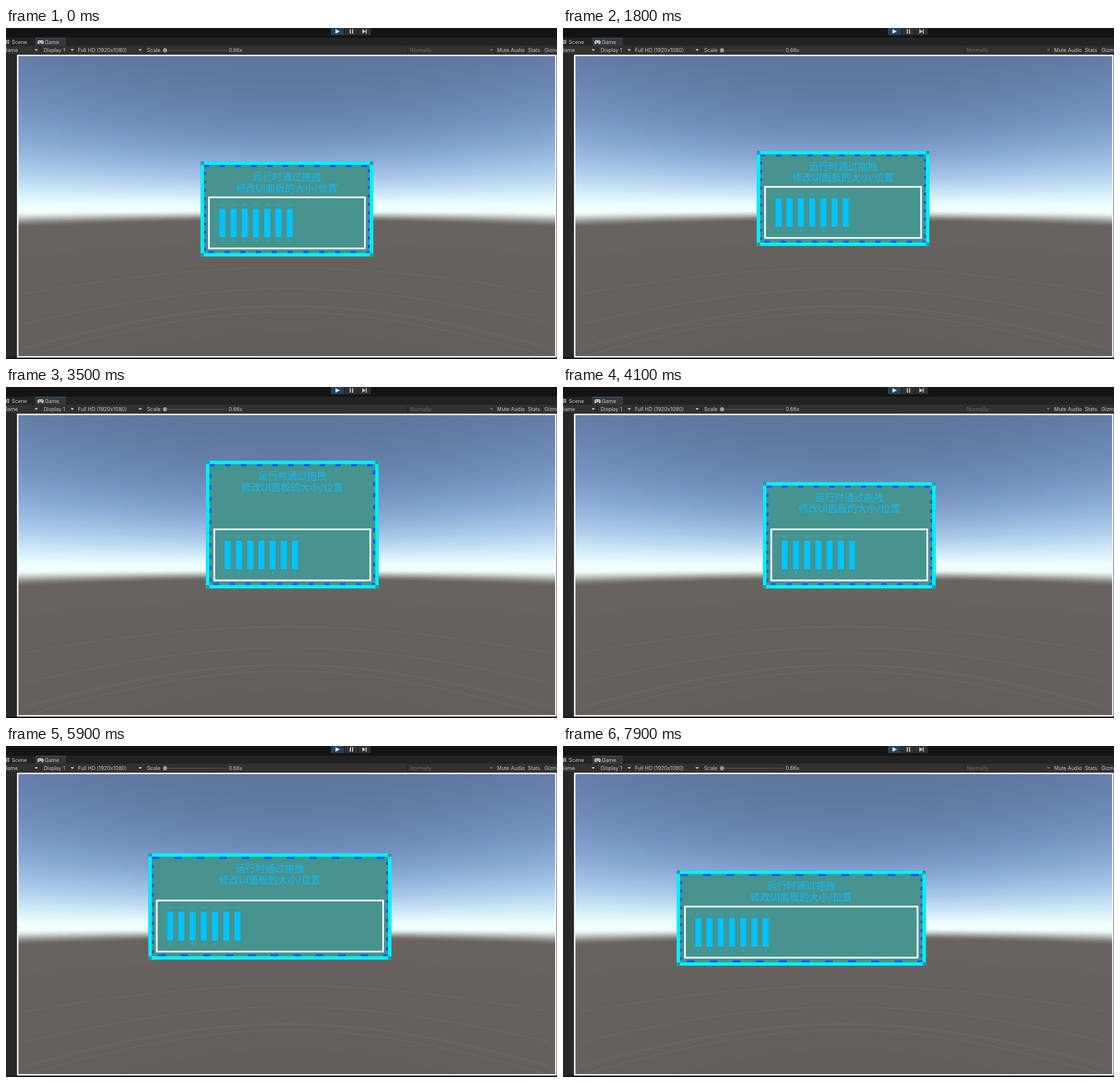
Write an HTML page with a canvas that moves like this. It is 965 by 580 pixels and loops after 8 s.

```html
<!DOCTYPE html>
<html lang="zh">
<head>
<meta charset="utf-8">
<style>
html, body { margin: 0; width: 100%; height: 100%; overflow: hidden; background: #282828; }
canvas, svg { position: absolute; left: 0; top: 0; display: block; }
.ui { font: 9px Inter, "Liberation Sans", sans-serif; fill: #c8c8c8; }
.title { font: 500 17.1px "Noto Sans CJK SC", "Noto Sans CJK", sans-serif; fill: #12baf4; text-anchor: middle; }
.small { font-family: "Liberation Sans", Arial, sans-serif; fill: #12baf4; text-anchor: middle; }
</style>
</head>
<body>
<canvas id="sky" width="965" height="580"></canvas>
<svg id="stage" width="965" height="580" viewBox="0 0 965 580"></svg>
<script>
const NS = "http://www.w3.org/2000/svg";
const stage = document.getElementById("stage");

function set(el, attrs) {
  for (const k in attrs) el.setAttribute(k, attrs[k]);
}
function add(parent, tag, attrs, text) {
  const el = document.createElementNS(NS, tag);
  set(el, attrs);
  if (text) el.textContent = text;
  parent.appendChild(el);
  return el;
}
const box = (x, y, width, height, fill, parent = stage) =>
  add(parent, "rect", { x, y, width, height, fill });
const label = (x, y, text, fill = "#c8c8c8") =>
  add(stage, "text", { x, y, class: "ui", style: "fill:" + fill }, text);
const shape = (d, fill = "#c4c4c4") => add(stage, "path", { d, fill });
const clamp = k => Math.min(1, Math.max(0, k));

// Skybox through a 60 degree camera: colour depends on elevation only
const CX = 492, CY = 312, FOCAL = 455;
const stretch = x => Math.hypot(FOCAL, x - CX) / FOCAL;

// Red fades fastest with height, blue slowest
const CHANNELS = [
  { zenith: 92, horizon: 240, reach: 70, power: 1.1, ground: 106 },
  { zenith: 114, horizon: 255, reach: 86, power: 1.2, ground: 100 },
  { zenith: 150, horizon: 254, reach: 128, power: 1.5, ground: 97 }
];
function skyColour(v) {
  const up = Math.max(0, -v), down = Math.max(0, v);
  const k = clamp((v - 6) / 20), haze = 1 - k * k * (3 - 2 * k);
  return CHANNELS.map(c => {
    const sky = c.zenith + (c.horizon - c.zenith) * Math.exp(-((up / c.reach) ** c.power));
    const ground = c.ground - down * .025;
    return ground + (sky - ground) * haze;
  });
}

function drawSky() {
  const ctx = document.getElementById("sky").getContext("2d");
  const ramp = [];
  for (let i = 0; i <= 1080; i++) ramp.push(skyColour(i / 2 - 270));
  const x0 = 21, y0 = 48, w = 942, h = 529;
  const img = ctx.createImageData(w, h);
  for (let x = 0; x < w; x++) {
    const s = stretch(x + x0);
    for (let y = 0; y < h; y++) {
      const v = (y + y0 - CY) / s;
      img.data.set([...ramp[Math.round((v + 270) * 2)], 255], (y * w + x) * 4);
    }
  }
  ctx.putImageData(img, x0, y0);
  ctx.strokeStyle = "rgba(150,146,140,.2)";
  for (const v of [108, 145, 175, 186]) {
    ctx.beginPath();
    for (let x = 30; x < 955; x += 5) ctx.lineTo(x, CY + v * stretch(x));
    ctx.stroke();
  }
}

function drawEditor() {
  box(0, 0, 965, 17, "#141414");
  box(0, 17, 965, 15, "#232323");
  box(51, 17, 54, 15, "#383838");
  box(51, 17, 54, 1, "#2f5f8f");
  box(0, 31, 965, 15, "#313131");
  box(0, 46, 965, 1, "#181818");
  box(0, 577, 965, 3, "#161616");
  add(stage, "rect", { x: 20.5, y: 48, width: 942.5, height: 528.2, fill: "none", stroke: "#fcfcfc", "stroke-width": 2.5 });

  box(569, 0, 23, 12.5, "#21435f");
  box(593, 0, 23, 12.5, "#303030");
  box(617, 0, 22, 12.5, "#303030");
  shape("M577 2L585 6L577 10Z", "#d8e4ee");
  shape("M602 2h2v8h-2zM606 2h2v8h-2z");
  shape("M624 2L630 6L624 10ZM630 2h1.7v8h-1.7z");

  shape("M0 22h6v1h-6zM0 25.5h6v1h-6zM1 20.5h1v8h-1zM4 20.5h1v8h-1z");
  shape("M58 21.5h5q3 0 3 3.5t-2 3.5l-2-2h-3l-2 2q-2 0-2-3.5t3-3.5z");
  box(57.5, 24, 2, 1, "#383838");
  box(62, 24, 1.5, 1, "#383838");
  label(10, 28, "Scene");
  label(68, 28, "Game");

  for (const x of [60, 122, 242, 703, 856, 910, 939]) box(x, 32, 1, 14, "#242424");
  label(-4, 42, "Game");
  label(66, 42, "Display 1");
  label(126, 42, "Full HD (1920x1080)");
  label(247, 42, "Scale");
  label(390, 42, "0.66x");
  label(707, 42, "Normally", "#6c6c6c");
  label(860, 42, "Mute Audio");
  label(914, 42, "Stats");
  label(943, 42, "Gizmos");
  for (const x of [53, 116, 235]) shape(`M${x - 3} 37h6l-3 3.5z`);
  shape("M847 37h6l-3 3.5z", "#6c6c6c");
  box(278, 38.5, 108, 1, "#5c5c5c");
  add(stage, "circle", { cx: 278.5, cy: 39, r: 3.7, fill: "#999" });
}

drawSky();
drawEditor();

// Panel parts
const panel = add(stage, "g", {});
const fill = box(0, 0, 1, 1, "#46938f", panel);
const dashes = [0, .285, .87, .55].map(start => ({
  start, el: add(panel, "line", { stroke: "#0050ff", "stroke-width": 3.6 })
}));
const rim = add(panel, "rect", { fill: "none", stroke: "#00f0fc", "stroke-width": 6 });
const knobs = [0, 1, 2, 3].map(() =>
  add(panel, "circle", { r: 2.6, fill: "#2fa8a8", stroke: "#22787e", "stroke-width": 1 }));
const titles = add(panel, "g", { class: "title" });
add(titles, "text", { y: 33.3 }, "运行时通过拖拽");
add(titles, "text", { y: 52.8 }, "修改UI面板的大小/位置");
const inner = add(panel, "rect", { fill: "none", stroke: "#fff", "stroke-width": 2.9 });
const chart = add(panel, "g", {});
for (let i = 0; i < 7; i++) {
  const x = 32.9 + i * 19.65;
  box(x, -83.6, 10.4, 50, "#00c3ff", chart);
  add(chart, "text", { x: x + 5.2, y: -89.3, class: "small", "font-size": 5 }, "100");
  add(chart, "text", { x: x + 5.2, y: -24, class: "small", "font-size": 7 }, "A");
}

// Each drag shifts the named edges by dx, dy; bx, by bow the path on the way
const drag = (start, end, edges, dx, dy, bx = 0, by = 0) =>
  ({ start, end, edges, dx, dy, bx, by });
const DRAGS = [
  drag(900, 1400, "ltrb", 102.2, -49.6, 0, -38),
  drag(1400, 1800, "ltrb", -103.7, 31.2),
  drag(1800, 2200, "ltrb", 10.9, -28.9, 30.5, -23.5),
  drag(3400, 3700, "t", 0, -94.2, 0, -30),
  drag(3800, 4100, "t", 0, 74.4),
  drag(4900, 5200, "r", 241.3, 0),
  drag(5300, 5500, "r", -118, 0),
  drag(5700, 6000, "ltrb", -151.2, 32),
  drag(7100, 7400, "tr", 157.2, -104.4, 17, 1.4),
  drag(7400, 7900, "tr", -146.4, 123.9)
];

function panelAt(t) {
  const p = { l: 340.8, t: 233.8, r: 643.2, b: 400.3 };
  for (const d of DRAGS) {
    const k = clamp((t - d.start) / (d.end - d.start));
    const bow = Math.sin(Math.PI * k);
    for (const e of d.edges)
      p[e] += e === "l" || e === "r" ? d.dx * k + d.bx * bow : d.dy * k + d.by * bow;
  }
  return p;
}

function draw(ms) {
  // The screen refreshes ten times a second
  const { l, t, r, b } = panelAt(Math.floor(ms % 8000 / 100) * 100);
  const w = r - l, h = b - t;
  set(fill, { x: l, y: t, width: w, height: h });
  set(rim, { x: l + 3, y: t + 3, width: w - 6, height: h - 6 });
  const L = l + 6, T = t + 6, R = r - 6, B = b - 6;
  const lines = [
    [L, T + 1.8, R, T + 1.8], [L, B - 1.4, R, B - 1.4],
    [L + 1.6, T, L + 1.6, B], [R - 1.6, T, R - 1.6, B]
  ];
  dashes.forEach(({ el, start }, i) => {
    const [x1, y1, x2, y2] = lines[i];
    const step = (i < 2 ? R - L : B - T) / 10.5;
    set(el, {
      x1, y1, x2, y2,
      "stroke-dasharray": `${step * .33} ${step * .67}`,
      "stroke-dashoffset": -start * step
    });
  });
  knobs.forEach((k, i) => set(k, { cx: i % 2 ? r - 3 : l + 3, cy: i < 2 ? t + 3 : b - 3 }));
  titles.setAttribute("transform", `translate(${(l + r) / 2} ${t})`);
  set(inner, { x: l + 14.6, y: b - 103.6, width: w - 29.2, height: 89.5 });
  chart.setAttribute("transform", `translate(${l} ${b})`);
}

const begin = performance.now();
function tick() {
  draw(performance.now() - begin);
  requestAnimationFrame(tick);
}
tick();
</script>
</body>
</html>
```
